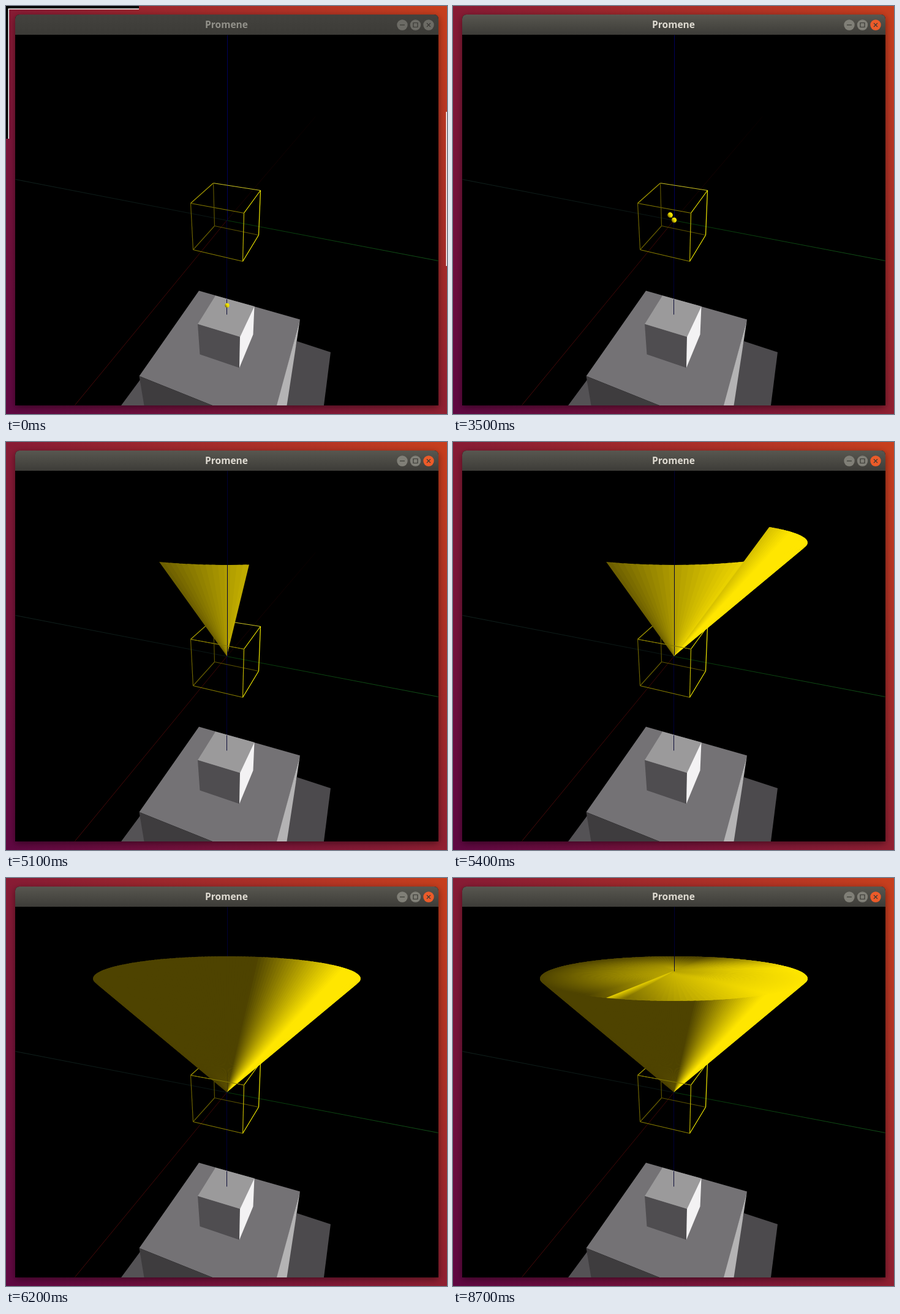
An HTML page with a canvas that plays this animation: 720 px wide and 667 px high, repeating every 8800 ms.

```html
<!DOCTYPE html>
<html>
<head>
<meta charset="utf-8">
<style>
html, body { margin: 0; width: 100%; height: 100%; overflow: hidden; background: #000; }
canvas { display: block; }
</style>
</head>
<body>
<canvas id="stage" width="720" height="667"></canvas>
<script>
const g = document.getElementById('stage').getContext('2d');
const rad = Math.PI / 180;
const LOOP = 8800;
const APEX = [360.5, 350], TOP = [360.5, 152], START = 111.5;
const clamp = (v, a = 0, b = 1) => Math.min(b, Math.max(a, v));
const progress = (t, from, to) => clamp((t - from) / (to - from));

function poly(color, ...pts) {
  g.fillStyle = color;
  g.beginPath();
  pts.forEach(p => g.lineTo(p[0], p[1]));
  g.closePath();
  g.fill();
}

function line(color, a, b, width = 1) {
  g.strokeStyle = color;
  g.lineWidth = width;
  g.beginPath();
  g.moveTo(a[0] + .5, a[1] + .5);
  g.lineTo(b[0] + .5, b[1] + .5);
  g.stroke();
}

function ramp(a, b, ...colors) {
  const r = g.createLinearGradient(a[0], a[1], b[0], b[1]);
  colors.forEach((c, i) => r.addColorStop(i / (colors.length - 1), c));
  return r;
}

function mix(a, b, k) {
  return `rgb(${a.map((v, i) => Math.round(v + (b[i] - v) * k))})`;
}

function desktop() {
  g.fillStyle = ramp([0, 667], [720, 0], '#5f0742', '#8b1d33', '#c83f1d');
  g.fillRect(0, 0, 720, 667);
  g.save();
  g.shadowColor = 'rgba(0,0,0,.45)';
  g.shadowBlur = 12;
  g.shadowOffsetY = 3;
  g.fillStyle = '#000';
  g.beginPath();
  g.roundRect(15, 14, 691, 639, [7, 7, 0, 0]);
  g.fill();
  g.restore();
}

function titleBar(focus) {
  g.fillStyle = ramp([0, 14], [0, 47],
    mix([67, 66, 62], [88, 87, 80], focus), mix([60, 59, 55], [61, 60, 56], focus));
  g.beginPath();
  g.roundRect(15, 14, 691, 33, [7, 7, 0, 0]);
  g.fill();
  g.fillStyle = mix([146, 145, 138], [223, 219, 210], focus);
  g.font = 'bold 15.5px "Open Sans", "Noto Sans", sans-serif';
  g.textAlign = 'center';
  g.fillText('Promene', 360, 36);
  [647, 668.5, 690].forEach((x, i) => {
    g.fillStyle = mix([108, 107, 101], i == 2 ? [236, 91, 41] : [128, 127, 119], focus);
    g.beginPath();
    g.arc(x, 31, 8.7, 0, 7);
    g.fill();
    g.strokeStyle = '#3a3935';
    g.lineWidth = 1.2;
    g.beginPath();
    if (i == 0) { g.moveTo(x - 4, 31); g.lineTo(x + 4, 31); }
    if (i == 1) g.rect(x - 3.5, 27.5, 7, 7);
    if (i == 2) {
      g.moveTo(x - 3, 28); g.lineTo(x + 3, 34);
      g.moveTo(x + 3, 28); g.lineTo(x - 3, 34);
    }
    g.stroke();
  });
}

function axes() {
  line(ramp([505, 180], APEX, '#080000', '#1d0303'), [505, 180], [360, 350]);
  line(ramp(APEX, [112, 652], '#3c0505', '#480909'), [360, 350], [112, 652]);
  line(ramp([15, 283], APEX, '#10211d', '#0a1614'), [15, 283], [360, 350]);
  line(ramp(APEX, [705, 416], '#063a0a', '#125018'), [360, 350], [705, 416]);
  line('#00005a', [361, 47], [361, 350]);
  line('#000038', [360, 350], [360, 480]);
}

function blocks() {
  poly('#4c4a4d', [475, 548], [530, 566], [519, 653], [450, 653]);
  poly('#545255', [219, 611], [188, 653], [228, 653]);
  poly('#747275', [315, 465.5], [480, 512.5], [443, 653], [337, 653], [217.5, 605]);
  poly('#3e3c3e', [217.5, 605], [337, 653], [225.5, 653]);
  poly('#b4b3b4', [480, 512.5], [458.5, 653], [442, 653]);
  poly('#9b9a9b', [342, 473.5], [405.5, 491], [382, 541], [313, 520]);
  poly('#4f4d50', [313, 520], [382, 541], [381, 591.5], [316.5, 569.5]);
  poly('#f3f2f3', [405.5, 491], [382, 541], [381, 591.5], [403.5, 537]);
  line('#0c0c38', [360, 479], [360, 504]);
}

const hi = [[338, 289], [415, 301], [388, 338], [301, 322]];
const lo = [[340, 359], [412, 374], [386, 417], [305, 398]];
const frontEdge = () => line('#857a00', hi[2], hi[3]);

function wireCube() {
  ['#c9c022', '#eee600', '#857a00', '#a59a00'].forEach((c, i) => line(c, hi[i], hi[(i + 1) % 4], 1.2));
  ['#5c5200', '#eee600', '#877c00', '#665c00'].forEach((c, i) => line(c, lo[i], lo[(i + 1) % 4], 1.2));
  ['#5c5300', '#f2ea00', '#bdb200', '#6c6200'].forEach((c, i) => line(c, hi[i], lo[i], 1.2));
}

// Point of the rim circle at an angle, seen in perspective
function rim(deg) {
  const e = .342, s = Math.sin(deg * rad), w = 1 - e * s;
  return [360.5 + 218.5 * Math.sqrt(1 - e * e) * Math.cos(deg * rad) / w,
          164.5 + 36.5 * (s - e) / w];
}

const light = deg => clamp(78 + 190 * Math.max(0, Math.cos((deg - 24) * rad) + .1), 78, 255);
const yellow = v => `rgb(${Math.round(v)},${Math.round(v * .92 - 5)},0)`;

// Slices overlap the next one so that no seams show
function cone(part, inside) {
  const sweep = part * 360, n = Math.ceil(part * 180), step = sweep / n;
  for (let i = 0; i < n; i++) {
    const deg = START - i * step;
    const a = rim(deg), b = rim(Math.max(deg - step * 1.6, START - sweep));
    const side = (a[0] - APEX[0]) * (b[1] - APEX[1]) - (a[1] - APEX[1]) * (b[0] - APEX[0]);
    if (side > 0 == inside) poly(yellow(light(deg - step / 2)), APEX, a, b);
  }
}

function lid() {
  for (let deg = 0; deg < 360; deg += 2) {
    const a = rim(deg);
    poly(ramp(TOP, a, yellow(208), yellow(light(deg + 1))), TOP, a, rim(deg + 3.2));
  }
  poly(ramp([300, 176], [304, 186], yellow(232), yellow(135)), TOP, [250, 196], [279, 198]);
}

function ball(x, y, r) {
  g.fillStyle = ramp([x - r, y + r * .7], [x + r, y - r * .7], '#5a4c00', '#e8d800', '#fff000');
  g.beginPath();
  g.arc(x, y, r, 0, 7);
  g.fill();
}

function balls(t) {
  const z = -2.2 * (1 - progress(t, 1548, 2520)), depth = 6.18 - .485 * z;
  const p = progress(t, 3410, 4390), far = 6.18 - 2.69 * p, k = 3.49 * p / far;
  const x = 360.5 - 110.5 * k, y = 350 - 153 * k;
  if (p > 0) {
    line('#8a7c00', [360, 350], [x, y]);
    ball(x, y, 26 / far);
  }
  ball(361, 350 - 459.4 * z / depth, 26 / depth);
}

function marquee() {
  g.fillStyle = '#000';
  g.fillRect(0, 0, 217, 4);
  g.fillRect(0, 0, 4, 217);
  g.fillStyle = '#fff';
  g.fillRect(4, 4, 213, 1.5);
  g.fillRect(3.5, 4, 1.5, 213);
  g.fillRect(718.5, 173, 1.5, 252);
}

function draw(t) {
  desktop();
  if (t < 100) marquee();
  titleBar(progress(t, 0, 500));
  g.save();
  g.beginPath();
  g.rect(15, 47, 691, 606);
  g.clip();
  axes();
  blocks();
  wireCube();
  if (t < 5100) balls(t);
  else {
    const part = progress(t, 5024, 5993);
    const capped = t >= 7000;
    cone(part, true);
    if (!capped) line('#000034', [361, 47], [361, 349]);
    cone(part, false);
    if (capped) {
      lid();
      line('#000034', [361, 47], [361, 152]);
    }
    frontEdge();
  }
  g.restore();
}

function tick(now) {
  draw(Math.floor(now % LOOP / 100) * 100);
  requestAnimationFrame(tick);
}
draw(0);
requestAnimationFrame(tick);
</script>
</body>
</html>
```
